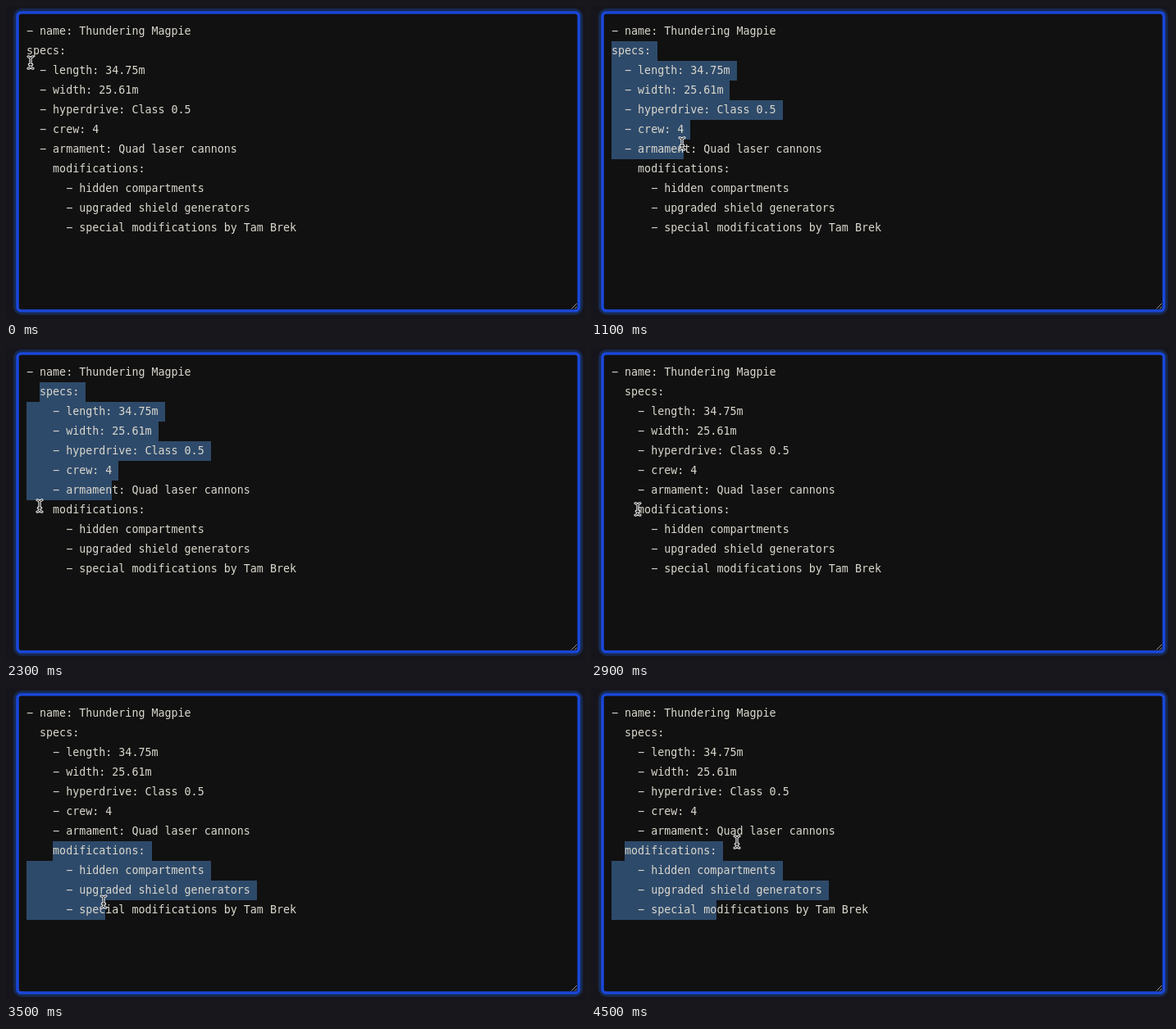
These frames come from a looping animation (706 px wide and 382 px high, 4600 ms). An HTML page:

```html
<!DOCTYPE html>
<html lang="en">
<head>
<meta charset="utf-8">
<title>Indenting a list</title>
<style>
  html, body { margin: 0; width: 100%; height: 100%; overflow: hidden; background: #17151c; }
  #stage { position: relative; width: 706px; height: 382px; overflow: hidden; }
  svg { position: absolute; left: 0; top: 0; }
  .row, .mark { position: absolute; left: 25px; height: 24px; }
  .row {
    font: 13.333px/24px "DejaVu Sans Mono", "Liberation Mono", monospace;
    color: #dad7cd; white-space: pre; font-kerning: none;
  }
  .mark { background: #2e4a6a; }
</style>
</head>
<body>
<div id="stage">
  <svg width="706" height="382" fill="none">
    <rect x="14" y="8" width="684.5" height="364" rx="5" stroke="#17294f" stroke-width="10"/>
    <rect x="14" y="8" width="684.5" height="364" rx="4.5" fill="#111" stroke="#1a47d8" stroke-width="3.6"/>
    <path d="M689.5 369.5l6.5-6.5M693.5 369.5l2.5-2.5" stroke="#a5a5a5" stroke-width=".9"/>
  </svg>
  <div id="marks"></div>
  <div id="rows"></div>
  <svg id="cursor" width="20" height="24" viewBox="-10 -12 20 24" fill="none" stroke-linecap="round">
    <path id="beam" d="M-3-7.2Q-.5-7.2 0-5.2Q.5-7.2 3-7.2M0-5.2V5.2M-3 7.2Q-.5 7.2 0 5.2Q.5 7.2 3 7.2M-1.8 2.5H1.8" stroke="#f2f2f2" stroke-width="2.8"/>
    <use href="#beam"/>
    <path d="M-3-7.2Q-.5-7.2 0-5.2Q.5-7.2 3-7.2M0-5.2V5.2M-3 7.2Q-.5 7.2 0 5.2Q.5 7.2 3 7.2M-1.8 2.5H1.8" stroke="#000" stroke-width="1"/>
  </svg>
</div>
<script>
const LOOP = 4600, STEP = 100;
const LEFT = 25, TOP = 19, ROW = 24, CHAR = 13.333 * 0.602;

const text = [
  "- name: Thundering Magpie",
  "specs:",
  "  - length: 34.75m",
  "  - width: 25.61m",
  "  - hyperdrive: Class 0.5",
  "  - crew: 4",
  "  - armament: Quad laser cannons",
  "    modifications:",
  "      - hidden compartments",
  "      - upgraded shield generators",
  "      - special modifications by Tam Brek"
];

// time, x, y of the pointer
const path = [
  [0, 30, 69], [200, 26, 58], [400, 26, 57], [600, 38, 79], [1100, 111, 168],
  [1300, 112, 170], [1700, 110, 172], [2300, 41, 194], [2800, 57, 198],
  [2900, 57, 198], [3200, 86, 226], [3500, 119, 261], [3700, 121, 262],
  [3900, 121, 262], [4100, 168, 268], [4200, 170, 264], [4500, 178, 188]
];

// each drag selects whole lines' worth of text, then shifts those lines sideways
const drags = [
  { from: 400, to: 1100, clear: 2800, row: 1, col: 0, last: 6, shiftAt: 1700, by: 2 },
  { from: 2900, to: 4100, clear: LOOP, row: 7, col: 4, last: 10, shiftAt: 4200, by: -2 }
];

function pointer(t) {
  const i = path.findIndex(p => p[0] > t);
  if (i < 0) return path[path.length - 1].slice(1);
  const [t0, x0, y0] = path[i - 1], [t1, x1, y1] = path[i];
  const k = (t - t0) / (t1 - t0);
  return [x0 + (x1 - x0) * k, y0 + (y1 - y0) * k];
}

function addRows(id, cls) {
  const box = document.getElementById(id);
  return text.map((_, i) => {
    const el = document.createElement("div");
    el.className = cls;
    el.style.top = TOP + ROW * i + "px";
    box.append(el);
    return el;
  });
}

const marks = addRows("marks", "mark");
const rows = addRows("rows", "row");
const cursor = document.getElementById("cursor");

function indent(line, by) {
  return by > 0 ? " ".repeat(by) + line : line.slice(-by);
}

function linesAt(t) {
  return text.map((line, i) => {
    for (const d of drags)
      if (t >= d.shiftAt && i >= d.row && i <= d.last) line = indent(line, d.by);
    return line;
  });
}

function selectionAt(t) {
  const d = drags.find(d => t >= d.from && t < d.clear);
  if (!d) return null;
  const [x, y] = pointer(Math.min(t, d.to));
  const shift = t >= d.shiftAt ? d.by : 0;
  return {
    row: d.row,
    col: d.col + shift,
    endRow: Math.floor((y - TOP) / ROW),
    endCol: Math.max(0, Math.round((x - LEFT) / CHAR - 0.15)) + shift
  };
}

function draw(t) {
  const lines = linesAt(t), sel = selectionAt(t);
  lines.forEach((line, i) => {
    const shown = line.replace("-", "\u2212");
    if (rows[i].textContent !== shown) rows[i].textContent = shown;
    let a = 0, b = 0;
    if (sel && i >= sel.row && i <= sel.endRow) {
      a = i === sel.row ? sel.col : 0;
      b = i === sel.endRow ? Math.min(sel.endCol, line.length) : line.length + 1;
    }
    const x = Math.round(a * CHAR);
    marks[i].style.left = LEFT + x + "px";
    marks[i].style.width = Math.max(0, Math.round(b * CHAR) - x) + "px";
  });
  const [x, y] = pointer(t);
  cursor.style.transform = `translate(${x - 10}px, ${y - 12}px)`;
}

const start = performance.now();
function tick() {
  const t = (performance.now() - start) % LOOP;
  draw(Math.floor(t / STEP) * STEP);
  requestAnimationFrame(tick);
}
tick();
</script>
</body>
</html>
```
